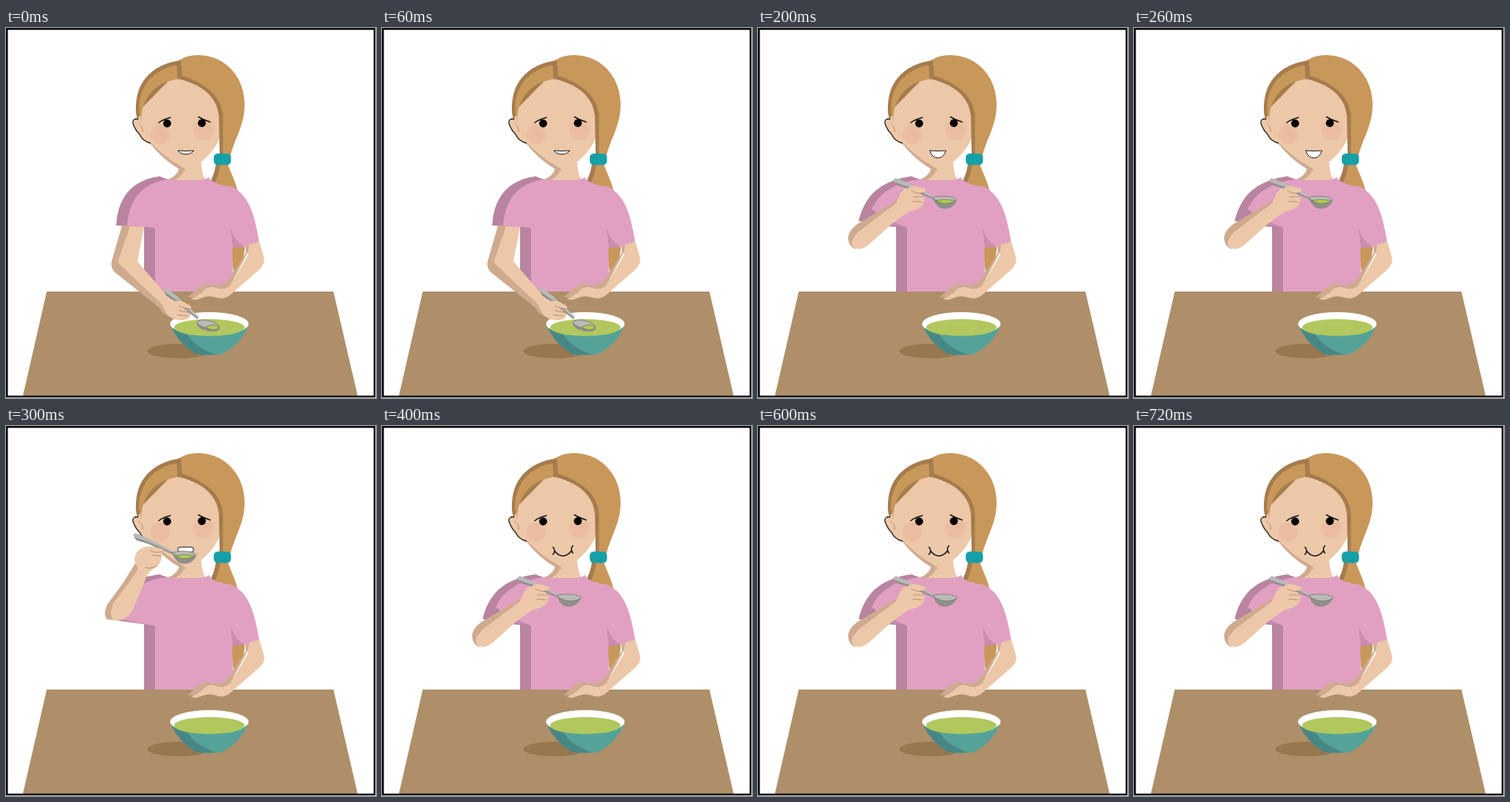
An HTML page for the animation above (800 ms loop, 504 by 504 pixels).

```html
<!DOCTYPE html>
<html lang="en">
<head>
<meta charset="utf-8">
<title>Eating soup</title>
<style>
  html, body { margin: 0; width: 100%; height: 100%; overflow: hidden; background: #fff; }
  svg { display: block; width: 100vw; height: 100vh; }
  .skin { fill: #ecc8a9; }
  .skin-shade { fill: #cfaa8f; }
  .shirt { fill: #e1a0c2; }
  .shirt-shade { fill: #b8849f; }
  .hair { fill: #c8975a; }
  .hair-shade { fill: #a67c4d; }
  .soup { fill: #b2c75e; }
  .metal { fill: #b9bab8; }
  .metal-shade { fill: #918f8a; }
  .line { fill: none; stroke: #111; stroke-width: 1.5; stroke-linecap: round; }
  .crease { fill: none; stroke: #b58f74; stroke-width: 1; stroke-linecap: round; }
  .teeth { fill: #fff; stroke: #111; stroke-width: 1; stroke-linejoin: round; }
</style>
</head>
<body>
<svg viewBox="0 0 504 504">
  <defs>
    <radialGradient id="blush">
      <stop offset="0" stop-color="#ebbb9e"/>
      <stop offset=".7" stop-color="#ebbea1"/>
      <stop offset="1" stop-color="#ecc8a9" stop-opacity="0"/>
    </radialGradient>
    <g id="handle">
      <path class="metal" d="M185 206Q187 203 192 206L208 213L240 229.500L239 233L206 218L189 213Q185 210 185 206Z"/>
      <path class="metal-shade" d="M186 210L207 217L239 231.500L239 233.500L205 219L189 214Z"/>
    </g>
    <g id="scoop">
      <path class="metal-shade" d="M238 231C242 244 250 247 257 246C265 245 270 239 271 234Z"/>
      <path class="metal" d="M238 231C245 228 267 228 271 234C266 240 245 240 238 231Z" stroke="#77756f" stroke-width=".8"/>
    </g>
    <path id="bite" class="soup" d="M242 235Q254 232 268 235Q263 240 251 239Z" stroke="#6f7942" stroke-width=".7"/>
    <g id="low-sleeve">
      <path class="shirt-shade" d="M209 202C181 206 153 221 150 269L190 272L222 207Z"/>
      <path class="shirt" d="M223 206C194 209 167 226 165 270L204 272L240 230Z"/>
    </g>
  </defs>

  <rect width="504" height="504" fill="#fff"/>

  <!-- ponytail and neck -->
  <path class="hair" d="M287 185C285 197 281 206 277 211L306 300L310 332C317 330 327 315 325 290L315 220C311 205 305 195 302 185Z"/>
  <path class="hair-shade" d="M286 185Q284 200 277 212L284 212Q290 200 292 185Z"/>
  <path class="skin" d="M236 170L238 190Q233 203 222 206L245 210L272 207Q266 200 265 170Z"/>
  <path class="skin-shade" d="M229 184L236 191Q233 202 221 206L228 208Q239 204 243 193Z"/>

  <!-- shirt -->
  <path class="shirt" d="M209 202Q214 207 236 207H262Q272 207 276 203Q281 213 307 216C330 227 338 250 345 292L323 298L308 299L310 359H188V268L200 225Z"/>
  <path class="shirt-shade" d="M188 268L203 271V359H188Z"/>
  <path d="M306 272L309 300L324 298Q310 288 306 272Z" fill="#c98cae"/>

  <!-- head -->
  <path class="skin" d="M187 124Q174 122 174 130Q177 139 182 145Q186 154 198 157Z"/>
  <path class="skin" d="M236 60C205 68 186 95 183 128Q188 148 197 157Q217 180 236 191Q245 197 254 191Q282 173 291 150L293 105C282 83 260 70 236 60Z"/>
  <path class="skin-shade" d="M195 154Q217 177 238 188L246 194Q240 196 234 191Q215 180 196 157Z"/>
  <path class="hair-shade" d="M239 44C204 48 178 69 177 106Q176 118 180 126L186 108L238 55Z"/>
  <path class="hair" d="M236 50C207 54 182 73 181 110L184 129C184 93 205 72 239 69Z"/>
  <path class="hair" d="M233 47C241 39 251 37 263 37C302 38 325 70 325 104C325 132 313 147 306 173L291 172V118C287 92 266 77 239 68Z"/>
  <path class="hair-shade" d="M232 46L238 43L240 65C273 76 292 92 295.500 118V173H291L290 120C287 92 266 77 234 69Z"/>
  <rect x="283" y="171" width="23.500" height="15.500" rx="5.500" fill="#159fa7"/>
  <path d="M180 124Q172 123 173 130Q176 139 182 145Q186 154 197 157" fill="none" stroke="#3d3026" stroke-width="1.600"/>
  <path class="crease" d="M181 130Q187 134 186 141"/>
  <circle cx="210" cy="145" r="17" fill="url(#blush)"/>
  <circle cx="269" cy="139" r="18" fill="url(#blush)"/>
  <circle cx="219.500" cy="130" r="5.400"/>
  <circle cx="266.800" cy="129.500" r="5.400"/>
  <path class="line" d="M208 129Q215 124 224 122M262 121Q269 125 278 128"/>

  <g class="mouth"><path class="teeth" d="M234 167Q245 168 256 167Q252 172 245 172Q238 172 234 167Z"/></g>
  <g class="mouth"><path class="teeth" d="M234 167Q245 168 256 167Q252 174 245 174Q238 174 234 167Z"/></g>
  <g class="mouth"><path class="teeth" d="M234 167Q245 168 256 167Q253 177 245 177Q237 177 234 167Z"/></g>
  <g class="mouth"><rect class="teeth" x="234" y="165" width="21.500" height="6.500" rx="3"/></g>
  <g class="mouth"><path class="line" d="M235 170Q240 177 247 177Q254 176 258 170M233 165Q237 170 233 175M260 163Q256 168 260 173"/></g>
  <g class="mouth"><path class="line" d="M235 171H259M233 165Q238 170 233 175M260 164Q256 170 260 175"/></g>

  <!-- table and bowl -->
  <path d="M55.500 359H446L479 501H23Z" fill="#ae8f69"/>
  <ellipse cx="235" cy="440" rx="43" ry="10" fill="#967750"/>
  <path d="M224 404C230 420 243 435 259 444Q277 447 295 444C312 435 325 420 330.500 404Z" fill="#55a298"/>
  <path d="M224 404C230 420 243 435 259 444Q272 446 285 445C265 436 252 429 245 413Z" fill="#478884"/>
  <ellipse cx="277" cy="403" rx="53.500" ry="16" fill="#fff"/>
  <ellipse class="soup" cx="277" cy="408" rx="48" ry="11.500"/>

  <!-- resting arm -->
  <path class="skin-shade" d="M326 297L335 295L303 355Q297 362 285 356L260 368L247 366Q252 364 258 357Q265 350 274 348Q284 352 294 350Q299 347 305 340L327 306Z"/>
  <path class="skin" d="M331 295L345 291L351 311Q354 321 345 329L305 364Q296 371 286 367Q276 364 269 367Q258 372 252 369Q262 365 267 360Q276 350 286 354Q297 358 305 351L329 311Z"/>

  <g class="pose">
    <use href="#low-sleeve"/>
    <path class="skin-shade" d="M158 269H176L158 319L214 371L223 394Q212 389 209 381L151 335Q140 327 145 314Z"/>
    <path class="skin" d="M169 270L188 271L179 318L217 362Q224 371 234 371L246 377Q254 381 252 387L250 395Q242 400 230 397Q218 393 213 377L157 324Q151 319 154 313Z"/>
    <use href="#handle" transform="translate(218 357) rotate(16) translate(-187 -207)"/>
    <g transform="rotate(12 276 405)">
      <ellipse class="metal-shade" cx="276" cy="406" rx="16" ry="7"/>
      <ellipse class="metal" cx="275" cy="404" rx="15" ry="5.500" stroke="#77756f" stroke-width=".8"/>
    </g>
    <path class="soup" d="M272 408Q279 402 290 406Q290 412 279 411Z" stroke="#6f7942" stroke-width=".8"/>
    <path class="skin" d="M226 372L239 372L251 378Q255 382 248 383L235 379Z"/>
    <path class="crease" d="M235 379L250 383M236 385L251 388M234 391L247 392"/>
  </g>

  <g class="pose">
    <use href="#low-sleeve"/>
    <path class="skin-shade" d="M158 269H177L160 312L230 328L238 348Q228 347 222 343L154 335Q140 331 144 319Z"/>
    <path class="skin" d="M169 270L188 271L179 305L225 321Q237 316 254 320L266 325Q270 329 267 338Q262 346 247 348Q236 346 230 334L158 322Q151 319 154 311Z"/>
    <g transform="translate(221 312) rotate(-7) translate(-187 -208)">
      <use href="#handle"/><use href="#scoop"/><use href="#bite"/>
    </g>
    <path class="skin" d="M232 325Q247 321 264 329Q265 333 257 333L238 331Z"/>
    <path class="crease" d="M247 331Q257 334 264 331M251 337L266 336M252 342L262 341"/>
  </g>

  <g class="pose">
    <path class="shirt-shade" d="M209 202C175 207 147 221 137 263L175 270L204 272L222 207Z"/>
    <path class="shirt" d="M223 206C193 208 166 222 155 246L177 266L204 272L240 230Z"/>
    <path d="M177 267L190 255L204 272Z" fill="#c98cae"/>
    <path class="shirt" d="M183 263L208 248L220 272H203Z"/>
    <path class="skin-shade" d="M187 236L137 266Q121 277 123 289Q125 299 133 301L145 277L193 248Z"/>
    <path class="skin" d="M188 239L194 225Q202 215 213 215L227 219Q230 223 223 227L227 233Q226 243 217 247L204 251L182 267L151 295Q138 305 129 298Q124 288 140 275Z"/>
    <use href="#handle"/><use href="#scoop"/><use href="#bite" class="bite"/>
    <path class="skin" d="M204 218Q210 213 221 217Q230 220 227 224Q222 226 212 224Z"/>
    <path class="crease" d="M209 222Q218 227 226 224M212 230L225 230M211 236L224 237"/>
  </g>

  <g class="pose">
    <path class="shirt-shade" d="M187 206L209 202L222 207L203 272L137 263L160 230Z"/>
    <path class="shirt" d="M221 206Q202 207 187 215L162 240L146 261L190 270L204 272L240 230Z"/>
    <path class="skin-shade" d="M178 184L160 213L138 243Q132 256 137 263L149 264L153 235L190 195Z"/>
    <path class="skin" d="M176 187Q173 176 181 169Q190 162 205 165Q215 168 212 177Q212 188 202 194Q192 199 188 214L172 252Q163 266 148 265Q139 261 146 242L172 207L180 194Z"/>
    <g transform="translate(-11.500 -58.500)">
      <use href="#handle"/><use href="#scoop"/><use href="#bite"/>
    </g>
    <path class="skin" d="M191 168Q201 163 214 168Q216 172 209 173L198 171Z"/>
    <path class="crease" d="M197 170Q205 174 213 171M199 176L211 177M190 193Q199 195 206 190"/>
  </g>

  <path d="M1.250 1.250H502V502H1.250Z" fill="none" stroke="#000" stroke-width="2.500"/>
</svg>
<script>
  const STEP = 100, LOOP = 800;
  const poseAt = [0, 1, 2, 3, 2, 2, 2, 2];
  const mouthAt = [0, 1, 2, 3, 4, 5, 4, 4];
  const poses = document.querySelectorAll('.pose');
  const mouths = document.querySelectorAll('.mouth');
  const bite = document.querySelector('.bite');
  const start = performance.now();

  const show = (node, on) => { node.style.display = on ? '' : 'none'; };
  const pick = (nodes, index) => nodes.forEach((node, i) => show(node, i === index));

  function draw(time) {
    const step = Math.floor((time % LOOP) / STEP);
    pick(poses, poseAt[step]);
    pick(mouths, mouthAt[step]);
    show(bite, step < 3);
  }

  function tick(now) {
    draw(Math.max(0, now - start));
    requestAnimationFrame(tick);
  }

  draw(0);
  requestAnimationFrame(tick);
</script>
</body>
</html>
```
